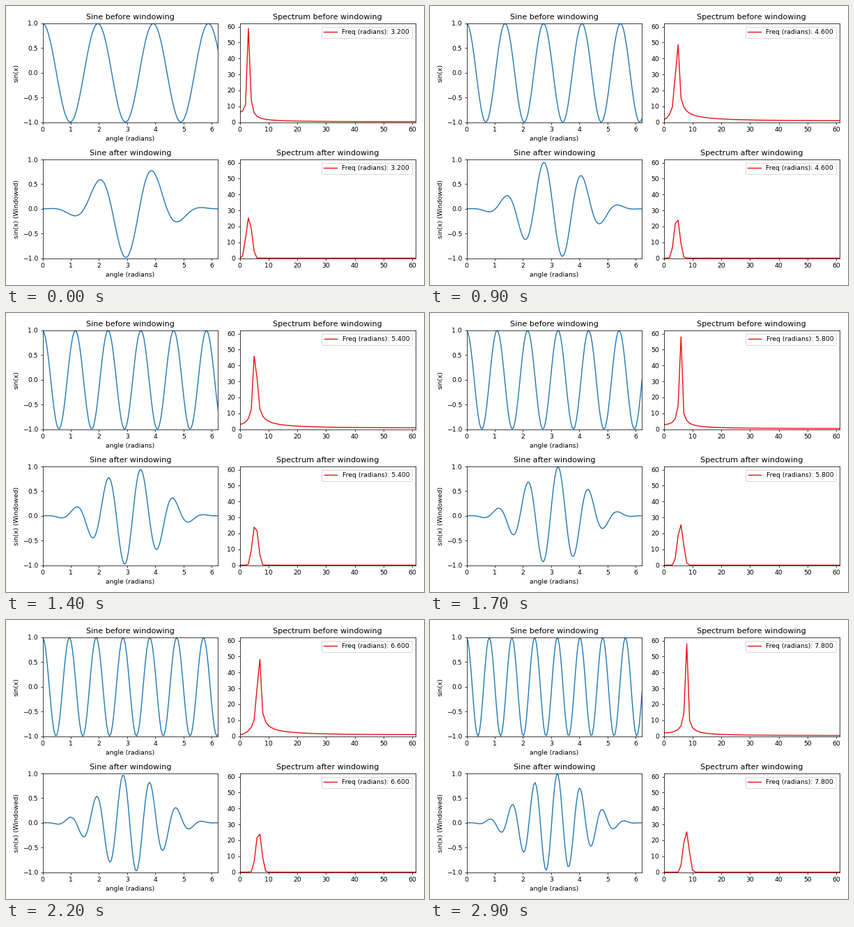
Animation, 600 px wide and 400 px high, one loop 3100 ms. Source, as a matplotlib script:

```python
import numpy as np
import matplotlib.pyplot as plt
from matplotlib.animation import FuncAnimation

W, H = 600, 400
DPI = W / 9                  # a 9 by 6 inch figure
N = 124                      # samples over one full turn
HALF = N // 2
FRAMES, INTERVAL = 31, 100

plt.rcParams.update({"font.family": "DejaVu Sans", "font.size": 10})

x = np.linspace(0, 2 * np.pi, N, endpoint=False)
window = np.blackman(N)

fig = plt.figure(figsize=(9, 6), dpi=DPI, facecolor="white")


def panel(left, top, title, xlim, ylim, xticks, yticks):
    """Axes placed by the pixel position of its top left corner."""
    width, height = 252, 141.5
    ax = fig.add_axes([left / W, 1 - (top + height) / H, width / W, height / H])
    ax.set(xlim=xlim, ylim=ylim, xticks=xticks, yticks=yticks)
    ax.set_title(title, fontsize=12)
    return ax


def wave_panel(top, title, ylabel):
    ax = panel(52.5, top, title, (0, x[-1]), (-1, 1),
               range(7), np.linspace(-1, 1, 5))
    ax.set_xlabel("angle (radians)")
    ax.set_ylabel(ylabel)
    line, = ax.plot([], [], color="C0", lw=1.5)
    return line


def spectrum_panel(top, title):
    tens = range(0, 61, 10)
    ax = panel(335.5, top, title, (0, HALF - 1), (0, HALF), tens, tens)
    line, = ax.plot([], [], color="#e81010", lw=1.5,
                    label="Freq (radians): 0.000")
    legend = ax.legend(loc="upper right")
    return line, legend.get_texts()[0]


rows = [
    (wave_panel(25, "Sine before windowing", "sin(x)"),
     *spectrum_panel(25, "Spectrum before windowing")),
    (wave_panel(220, "Sine after windowing", "sin(x) (Windowed)"),
     *spectrum_panel(220, "Spectrum after windowing")),
]


def update(i):
    # 11 frequency steps spread over every 14 ticks
    freq = 3.2 + 0.2 * ((11 * i + 4) // 14)
    signal = np.cos(freq * x)
    artists = []
    for (wave, spectrum, text), y in zip(rows, (signal, signal * window)):
        wave.set_data(x, y)
        spectrum.set_data(np.arange(HALF), np.abs(np.fft.fft(y))[:HALF])
        text.set_text(f"Freq (radians): {freq:.3f}")
        artists += [wave, spectrum, text]
    return artists


anim = FuncAnimation(fig, update, frames=FRAMES, interval=INTERVAL,
                     init_func=lambda: update(0), repeat=True, repeat_delay=0)
plt.show()
```
